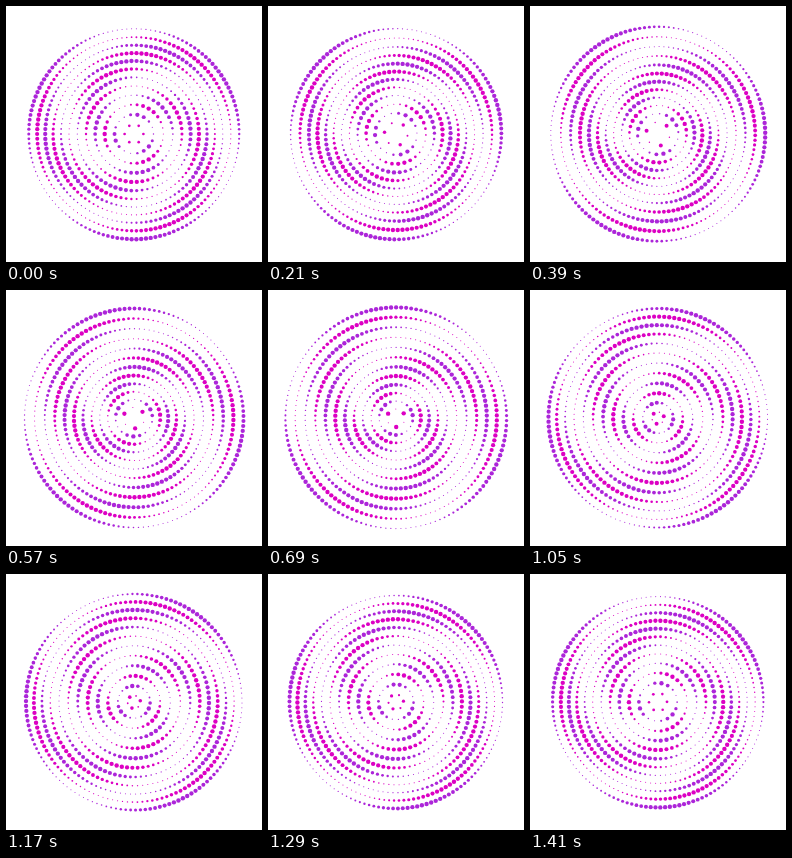
Animation of 256x256 px, one loop 1440 ms. Source, as an HTML page:

```html
<!DOCTYPE html>
<html lang="en">
<head>
<meta charset="utf-8">
<title>Spiral dots</title>
<style>
  html, body { margin: 0; width: 100%; height: 100%; overflow: hidden; background: #fff; }
  svg { display: block; width: 100%; height: 100%; }
</style>
</head>
<body>
<svg id="stage" viewBox="0 0 256 256"></svg>
<script>
const LOOP = 1440, STEP = 30;
const RINGS = 12, GAP = 9, CENTER = 128;
const COLORS = ["#ac25d9", "#dc00c3"];
const TAU = Math.PI * 2;
const rad = deg => deg * Math.PI / 180;

const svg = document.getElementById("stage");
const NS = "http://www.w3.org/2000/svg";
const dots = [];

function add(tag, parent, attrs) {
  const el = document.createElementNS(NS, tag);
  for (const key in attrs) el.setAttribute(key, attrs[key]);
  return parent.appendChild(el);
}

for (let ring = 1; ring <= RINGS; ring++) {
  const count = 6 * (2 * ring - 1);
  const group = add("g", svg, { fill: COLORS[ring % 2] });
  for (let i = 0; i < count; i++) {
    dots.push({ ring, i, count, el: add("circle", group, {}) });
  }
}

// Rings breathe and turn by one dot per loop, in alternating directions,
// under a three-armed size wave.
function draw(time) {
  const u = time / LOOP;
  for (const { ring, i, count, el } of dots) {
    const turn = ring % 2 ? u : -u;
    const angle = TAU * (i + turn) / count;
    const dist = GAP * ring + 3 * Math.cos(TAU * u + rad(21.8 * ring - 104.3));
    const wave = Math.cos(3 * angle - TAU * u - rad(90 + 48 * (ring - 1)));
    el.setAttribute("cx", (CENTER + dist * Math.cos(angle)).toFixed(2));
    el.setAttribute("cy", (CENTER + dist * Math.sin(angle)).toFixed(2));
    el.setAttribute("r", (1.35 + 0.85 * wave).toFixed(3));
  }
}

const start = performance.now();
function tick(now) {
  const t = Math.max(0, now - start) % LOOP;
  draw(Math.floor(t / STEP) * STEP);
  requestAnimationFrame(tick);
}
draw(0);
requestAnimationFrame(tick);
</script>
</body>
</html>
```
